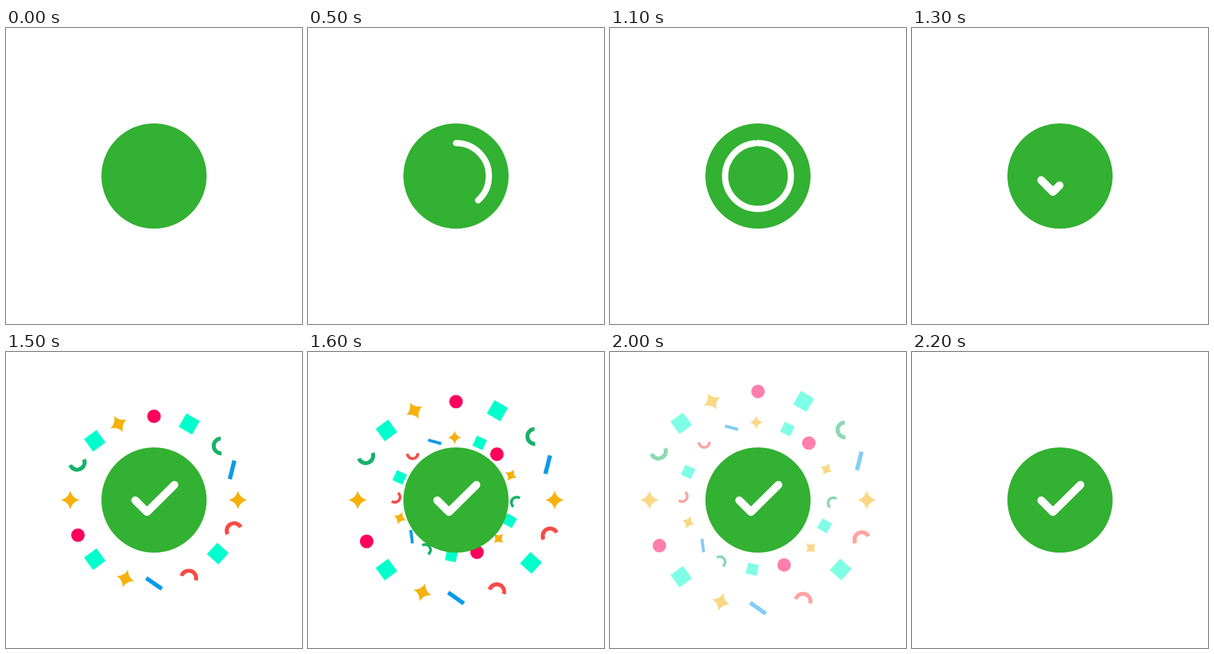
Recreate the animation shown at these times as an HTML page with a canvas. Size 450x450 px, loop 2.6 s.

```html
<!DOCTYPE html>
<html>
<head>
<meta charset="utf-8">
<style>
html, body { margin: 0; width: 100%; height: 100%; overflow: hidden; background: #fff }
canvas { display: block }
</style>
</head>
<body>
<canvas id="stage" width="450" height="450"></canvas>
<script>
const ctx = document.getElementById('stage').getContext('2d');
const C = 225, LOOP = 2600, STEP = 100;
const TEAL = '#00ffcc', GOLD = '#f6b10c', PINK = '#ff005c', BLUE = '#0a9bea', GREEN = '#17b169', RED = '#f84b45';
const clamp = v => Math.max(0, Math.min(1, v));
const easeOut = u => 1 - (1 - clamp(u)) ** 4;

// Each piece is drawn around its own origin; k is its size.
const square = color => k => {
  const a = 23.5 * k;
  ctx.fillStyle = color;
  ctx.fillRect(-a / 2, -a / 2, a, a);
};
const strip = color => k => {
  ctx.fillStyle = color;
  ctx.fillRect(-3.2 * k, -14.5 * k, 6.4 * k, 29 * k);
};
const dot = color => () => {
  ctx.fillStyle = color;
  ctx.beginPath();
  ctx.arc(0, 0, 10.3, 0, 7);
  ctx.fill();
};
const arch = color => k => {
  ctx.strokeStyle = color;
  ctx.lineWidth = 6 * k;
  ctx.lineCap = 'butt';
  ctx.beginPath();
  ctx.arc(0, 0, 11.3 * k, Math.PI, 0);
  ctx.stroke();
};
const star = color => k => {
  const r = 14 * k, c = 3 * k;
  ctx.fillStyle = color;
  ctx.beginPath();
  ctx.moveTo(0, -r);
  ctx.quadraticCurveTo(c, -c, r, 0);
  ctx.quadraticCurveTo(c, c, 0, r);
  ctx.quadraticCurveTo(-c, c, -r, 0);
  ctx.quadraticCurveTo(-c, -c, 0, -r);
  ctx.fill();
};

const sq = square(TEAL), bar = strip(BLUE), ball = dot(PINK), spark = star(GOLD),
      greenArch = arch(GREEN), redArch = arch(RED);

// shape, resting x and y, turn in degrees
const outer = [
  [ball, 225, 61, 0], [sq, 294, 76, 30], [greenArch, 356.5, 119, -93], [bar, 378, 166, 14],
  [spark, 389.5, 225, 0], [redArch, 382, 285, -28], [sq, 350, 330, 42], [redArch, 293, 378, 17],
  [bar, 225, 388.5, 125], [spark, 169, 379, 17], [sq, 109, 341, 54], [ball, 76, 294, 0],
  [spark, 61, 225, 0], [greenArch, 74.5, 151, 158], [sq, 109, 109, 54], [spark, 155.5, 76, -29]
];
const inner = [
  [spark, 222.5, 109, 0], [sq, 269, 119, 25], [ball, 301, 140, 0], [spark, 327, 179, 28],
  [greenArch, 337.5, 229.5, -53], [sq, 324.5, 263.5, 29], [spark, 304, 296.5, 45], [ball, 264, 322, 0],
  [sq, 216.5, 328.5, 12], [greenArch, 168, 317.5, 56], [bar, 142.5, 293, -7], [spark, 121, 258.5, 22],
  [redArch, 111.5, 219.5, 127], [sq, 120.5, 183, 25], [redArch, 144.5, 138.5, 177], [bar, 185.5, 117, 105]
];

function burst(pieces, size, spread) {
  for (const [shape, x, y, turn] of pieces) {
    ctx.save();
    ctx.translate(C + (x - C) * spread, C + (y - C) * spread);
    ctx.rotate(turn * Math.PI / 180);
    shape(size);
    ctx.restore();
  }
}

function drawRing(t) {
  const sweep = clamp((t - 117) / 1000) * 2 * Math.PI;
  ctx.lineWidth = 9.5;
  ctx.beginPath();
  ctx.arc(C, C, 50, -Math.PI / 2, -Math.PI / 2 + Math.max(sweep, 0.001));
  ctx.stroke();
}

function drawCheck(p) {
  const [ax, ay, bx, by, ex, ey] = [196.5, 225.5, 214.3, 243.3, 256, 202];
  const first = Math.hypot(bx - ax, by - ay), second = Math.hypot(ex - bx, ey - by);
  const length = p * (first + second);
  const u = clamp(length / first), v = clamp((length - first) / second);
  const drop = 11 * (1 - p);
  ctx.lineWidth = 12;
  ctx.beginPath();
  ctx.moveTo(ax, ay + drop);
  ctx.lineTo(ax + (bx - ax) * u, ay + (by - ay) * u + drop);
  if (v > 0) ctx.lineTo(bx + (ex - bx) * v, by + (ey - by) * v + drop);
  ctx.stroke();
}

function draw(t) {
  ctx.fillStyle = '#fff';
  ctx.fillRect(0, 0, 450, 450);

  if (t > 1250 && t < 2200) {
    ctx.globalAlpha = clamp((2200 - t) / 400);
    burst(outer, 1, easeOut((t - 1276) / 726) / 0.994);
    burst(inner, 0.71, easeOut((t - 1379) / 659) / 0.983);
    ctx.globalAlpha = 1;
  }

  ctx.fillStyle = '#32b132';
  ctx.beginPath();
  ctx.arc(C, C, 80, 0, 7);
  ctx.fill();

  ctx.strokeStyle = '#fff';
  ctx.lineCap = ctx.lineJoin = 'round';
  if (t >= 1200) drawCheck(clamp((t - 1183) / 250));
  else if (t >= 100) drawRing(t);
}

const start = performance.now();
function tick() {
  const t = (performance.now() - start) % LOOP;
  draw(Math.min(Math.floor(t / STEP) * STEP, 2200));
  requestAnimationFrame(tick);
}
tick();
</script>
</body>
</html>
```
